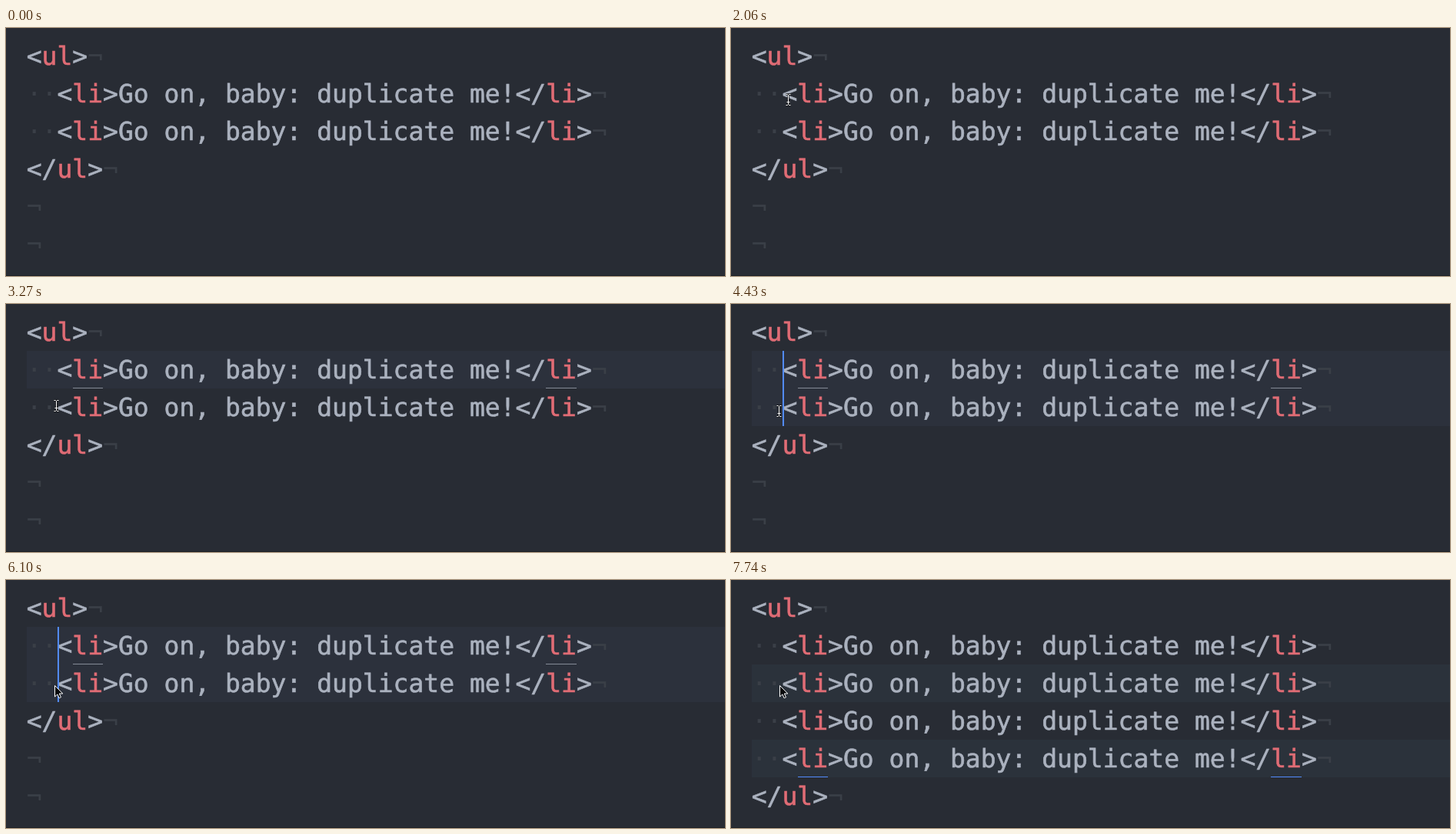
An HTML page for the animation above (8 s loop, 935 by 323 pixels).

```html
<!DOCTYPE html>
<html lang="en">
<head>
<meta charset="utf-8">
<style>
  html, body { margin: 0; width: 100%; height: 100%; overflow: hidden; background: #282c34; }
  svg { display: block; }
  text {
    font: 33px "DejaVu Sans Mono", monospace; white-space: pre; text-rendering: geometricPrecision;
    fill: #abb2bf; stroke: #abb2bf; stroke-width: 0.6;
  }
  .tag { fill: #e06c75; stroke: #e06c75; }
  .dim { fill: #3a3f47; stroke: none; }
  .band { fill: #2c313c; }
  #after .band { fill: #2b323b; }
  .caret { fill: #528bff; }
  .match { fill: #858b97; }
  .edge { fill: #1d2026; }
  #beam path { fill: none; stroke: #fff; }
  #beam path:first-child { stroke: #14161a; stroke-width: 2.6; }
</style>
</head>
<body>
<svg id="stage" width="935" height="323" viewBox="0 0 935 323"></svg>
<script>
const LOOP = 8000, LEFT = 27, CHAR = 19.867, ROW = 49;
const BLINKS = [2640, 2990, 3440, 3900, 4320, 4910, 5320, 5740, 6100, 6930, 7320, 7740];

const column = n => LEFT + n * CHAR;
const rowTop = row => 12 + row * ROW;
const rect = (cls, x, y, w, h) => `<rect class="${cls}" x="${x}" y="${y}" width="${w}" height="${h}"/>`;
const span = (cls, text) => `<tspan class="${cls}">${text}</tspan>`;
const open = name => `&lt;${span("tag", name)}&gt;`;
const close = name => `&lt;/${span("tag", name)}&gt;`;
const line = (row, text) =>
  `<text x="${LEFT - 0.3}" y="${rowTop(row) + 36}">${text}${span("dim", "¬")}</text>`;
const item = row =>
  line(row, span("dim", "··") + open("li") + "Go on, baby: duplicate me!" + close("li"));
const band = row => rect("band", LEFT, rowTop(row), 935 - LEFT, ROW);
const caret = row => rect("caret", 67, rowTop(row), 2, ROW);
const match = (cls, row) => [3, 34].map(col =>
  rect(cls, Math.round(column(col)), rowTop(row) + ROW - 1, col === 3 ? 39 : 40, 1)).join("");
const group = (id, content) => `<g id="${id}">${content}</g>`;
const list = count => line(0, open("ul")) +
  Array.from({ length: count }, (_, i) => item(i + 1)).join("") + line(count + 1, close("ul"));

const beamPath = `<path d="M-3-7h2l1 1 1-1h2M0-6V6M-3 7h2l1-1 1 1h2M-2 3h4"/>`;

document.getElementById("stage").innerHTML =
  group("before",
    group("bandA", band(1)) + group("bandB", band(2)) +
    list(2) + line(4, "") + line(5, "") +
    group("matchA", match("match", 1)) +
    group("caretA", caret(1)) + group("caretB", caret(2))) +
  group("after",
    band(2) + band(4) + list(4) + match("caret", 4) +
    group("caretsCopied", caret(2) + caret(4))) +
  rect("edge", 0, 322, 935, 1) +
  group("beam", beamPath + beamPath) +
  group("arrow", `<path transform="translate(63.5 137.5)" fill="#08090b" stroke="#fff"
    d="M0 0V14.5L3.4 11.4 5.6 16.3 8 15.2 5.8 10.5H10.3Z"/>`);

const parts = Object.fromEntries([...document.querySelectorAll("g")].map(g => [g.id, g]));
const show = (id, on) => { parts[id].style.display = on ? "" : "none"; };
const mix = (a, b, u) => a + (b - a) * u;

function beamPosition(t) {
  if (t < 2290) {
    const u = Math.max(0, Math.min(1, Math.floor((t - 1440) / 60.7) / 13));
    return [68 + 216 * (1 - u) ** 2.3, 92 + 122 * (1 - u) ** 3.1];
  }
  if (t < 2990) return [67, 91];
  const time = Math.min(3490, 2990 + Math.floor((t - 2990) / 55.5) * 55.5 + 55.5);
  if (time < 3290) return [67, mix(91, 130, Math.min(1, (time - 2990) / 280))];
  const u = Math.min(1, (time - 3270) / 220);
  return [mix(67, 63, u), mix(130, 139, u)];
}

function draw(now) {
  const t = now % LOOP;
  const lit = BLINKS.filter(time => t >= time).length % 2 === 1;
  show("before", t < 6460);
  show("after", t >= 6460);
  show("bandA", t >= 2640);
  show("bandB", t >= 4430);
  show("matchA", t >= 2690);
  show("caretA", lit);
  show("caretB", lit && t >= 4430);
  show("caretsCopied", lit);
  show("beam", t >= 1440 && t < 5260);
  show("arrow", t >= 5260);
  const [x, y] = beamPosition(t).map(Math.round);
  parts.beam.setAttribute("transform", `translate(${x - 0.5} ${y + 0.5})`);
  requestAnimationFrame(() => draw(performance.now()));
}
draw(0);
</script>
</body>
</html>
```
